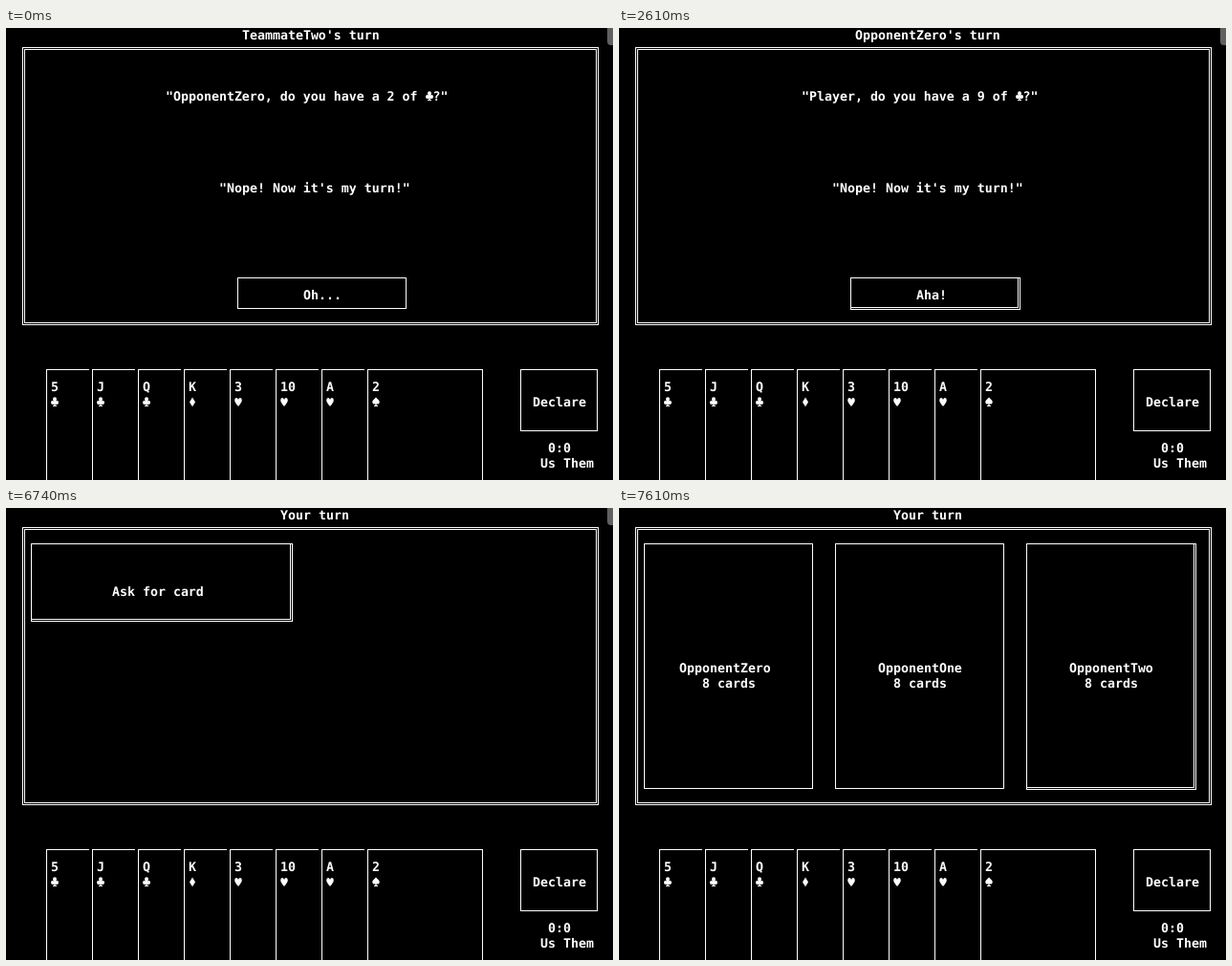
Write an HTML page that moves like this. It is 635 by 473 pixels and loops after 8 s.

```html
<!DOCTYPE html>
<html lang="en">
<head>
<meta charset="utf-8">
<title>Card game</title>
<style>
  html, body { margin: 0; width: 100%; height: 100%; overflow: hidden; background: #000; }
  svg { display: block; width: 635px; height: 473px; }
  text { font: bold 13.288px "DejaVu Sans Mono", "Liberation Mono", monospace; fill: #fff;
         white-space: pre; text-rendering: geometricPrecision; }
  .line { fill: none; stroke: #fff; stroke-linecap: square; shape-rendering: crispEdges; }
  .suit { fill: #fff; }
</style>
</head>
<body>
<svg viewBox="0 0 635 473">
  <rect width="635" height="473"/>
  <g id="table"></g>
  <g id="screen"></g>
  <path id="thumb" d="M629 0H635V18H633Q629 18 629 14Z" fill="#606060"/>
</svg>
<script>
const LOOP = 8000;
const ROW = 16, COL = 8;

// Suit shapes inside one 8 by 16 character cell
const SUITS = {
  '♣': 'M2 4.4a2 2.2 0 0 1 4 0L5.4 6.4Q8 5.4 8 8Q8 10.2 6 10.1Q5.1 10 4.7 9.4V11H6V12H2V11H3.3V9.4Q2.9 10 2 10.1Q0 10.2 0 8Q0 5.4 2.6 6.4Z',
  '♠': 'M4 2.5L7.4 6Q8.4 8 7 9.2Q5.6 10 4.7 9V11H6V12H2V11H3.3V9Q2.4 10 1 9.2Q-.4 8 .6 6Z',
  '♥': 'M4 5Q4.5 3 6 3Q8 3.2 7.8 6Q7.4 8 4 12Q.6 8 .2 6Q0 3.2 2 3Q3.5 3 4 5Z',
  '♦': 'M4 2.5L7 7.5L4 12.3L1 7.5Z'
};

const line = d => `<path class="line" transform="translate(.5 .5)" d="${d}"/>`;
const rect = (x1, y1, x2, y2) => `M${x1} ${y1}H${x2}V${y2}H${x1}Z`;

function text(x, row, str) {
  let out = '';
  const plain = [...str].map((ch, i) => {
    if (!SUITS[ch]) return ch;
    out += `<path class="suit" transform="translate(${x + i * COL} ${row * ROW})" d="${SUITS[ch]}"/>`;
    return '\u00a0';
  }).join('');
  return out + `<text x="${x}" y="${row * ROW + 12}">${plain}</text>`;
}

// Hover doubles the right and bottom edges, pressing doubles the left and top
function button(x1, y1, x2, y2, state) {
  if (state === 'hover')
    return line(rect(x1, y1, x2 + 1, y2 + 1) + `M${x2 - 1} ${y1}V${y2 - 1}H${x1}`);
  if (state === 'press')
    return line(rect(x1 - 1, y1 - 1, x2, y2) + `M${x1 + 1} ${y2}V${y1 + 1}H${x2}`);
  return line(rect(x1, y1, x2, y2));
}

function table() {
  const hand = ['5♣', 'J♣', 'Q♣', 'K♦', '3♥', '10♥', 'A♥', '2♠'];
  let out = line(rect(17, 20, 619, 310) + rect(19, 22, 617, 308));
  hand.forEach((card, i) => {
    const x = 42 + 48 * i;
    const last = i === hand.length - 1;
    out += line(`M${x} 473V357H` + (last ? '498V473' : x + 44));
    out += text(x + 5, 23, card.slice(0, -1)) + text(x + 5, 24, card.slice(-1));
  });
  return out + button(538, 357, 618, 421) + text(551, 24, 'Declare') +
    text(567, 27, '0:0') + text(559, 28, 'Us Them');
}

const dialog = (title, x, question, reply) => state =>
  text(247, 0, title) + text(x, 4, question) + text(223, 10, '"Nope! Now it\'s my turn!"') +
  button(242, 261, 418, 293, state) + text(311, 17, reply);

const missed = dialog("TeammateTwo's turn", 167, '"OpponentZero, do you have a 2 of ♣?"', 'Oh...');
const asked = dialog("OpponentZero's turn", 191, '"Player, do you have a 9 of ♣?"', 'Aha!');

const menu = state => text(287, 0, 'Your turn') +
  button(26, 37, 298, 117, state) + text(111, 5, 'Ask for card');

const opponents = hovered => text(287, 0, 'Your turn') +
  [['Zero', 63, 87], ['One', 271, 287], ['Two', 471, 487]].map(([name, nameX, countX], i) => {
    const x = 26 + 200 * i;
    return button(x, 37, x + 176, 293, i === hovered ? 'hover' : '') +
      text(nameX, 10, 'Opponent' + name) + text(countX, 11, '8 cards');
  }).join('');

const steps = [
  [0, missed, ''], [1500, missed, 'hover'], [1550, missed, ''], [1750, missed, 'hover'],
  [2010, missed, 'press'], [2110, asked, ''], [2160, asked, 'hover'], [2460, asked, ''],
  [2610, asked, 'hover'], [5000, asked, 'press'], [5300, menu, ''], [6740, menu, 'hover'],
  [6950, menu, 'press'], [7100, opponents, -1], [7150, opponents, 1],
  [7560, opponents, -1], [7610, opponents, 2]
];

const byId = id => document.getElementById(id);
let shown = null;

function draw(t) {
  const step = steps.findLast(s => s[0] <= t);
  if (step === shown) return;
  shown = step;
  const [start, view, state] = step;
  byId('screen').innerHTML = view(state);
  byId('thumb').style.display = start < 6950 ? '' : 'none';
}

byId('table').innerHTML = table();
draw(0);
const begin = performance.now();
function tick() {
  draw((performance.now() - begin) % LOOP);
  requestAnimationFrame(tick);
}
requestAnimationFrame(tick);
</script>
</body>
</html>
```
